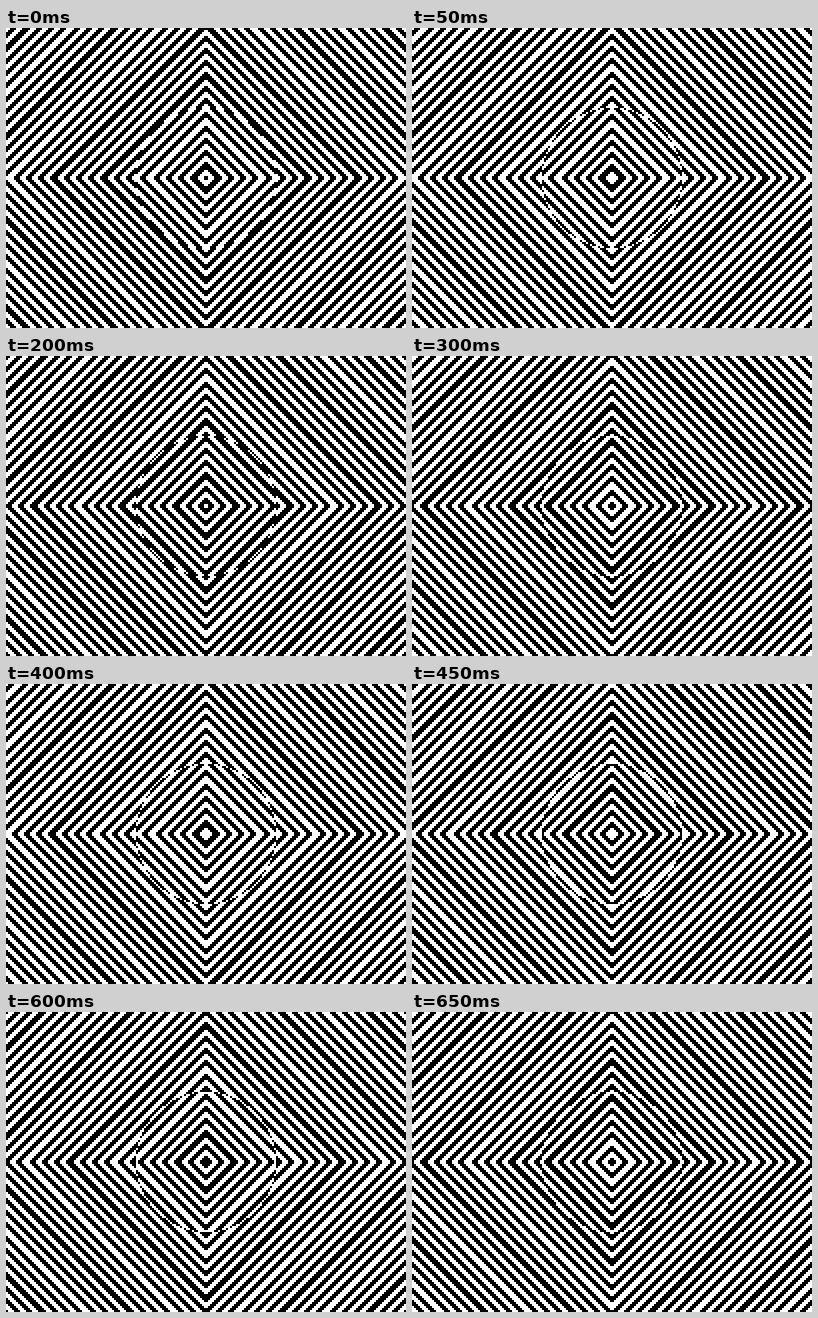
An HTML page with a canvas for the animation above (700 ms loop, 400 by 300 pixels).

```html
<!DOCTYPE html>
<html lang="en">
<head>
<meta charset="utf-8">
<title>Diamond waves</title>
<style>
  html, body { margin: 0; width: 100%; height: 100%; overflow: hidden; background: #fff; }
  canvas { display: block; width: 400px; height: 300px; image-rendering: pixelated; }
</style>
</head>
<body>
<canvas id="stage" width="200" height="150"></canvas>
<script>
  // Each canvas pixel is a 2 by 2 block on the stage.
  const W = 200, H = 150, RADIUS = 35;
  const STEP_MS = 50, STEPS = 7;
  const START = 0.55, SHIFT = 0.9;
  const BLACK = 0xff000000, WHITE = 0xffffffff;

  const ctx = document.getElementById('stage').getContext('2d');
  const image = ctx.createImageData(W, H);
  const pixels = new Uint32Array(image.data.buffer);

  // Rings shrink inside the circle and grow outside it.
  function draw(step) {
    const phase = (step + START) / STEPS * 2 * Math.PI;
    for (let y = 0, i = 0; y < H; y++) {
      const dy = Math.abs(y + 0.5 - H / 2);
      for (let x = 0; x < W; x++, i++) {
        const dx = Math.abs(x + 0.5 - W / 2);
        const turn = Math.hypot(dx, dy) < RADIUS ? phase : -phase;
        pixels[i] = Math.sin(dx + dy + SHIFT + turn) > 0 ? BLACK : WHITE;
      }
    }
    ctx.putImageData(image, 0, 0);
  }

  const start = performance.now();
  let shown = 0;
  draw(0);

  function tick() {
    const step = Math.floor((performance.now() - start) / STEP_MS) % STEPS;
    if (step !== shown) {
      shown = step;
      draw(step);
    }
    requestAnimationFrame(tick);
  }
  requestAnimationFrame(tick);
</script>
</body>
</html>
```
